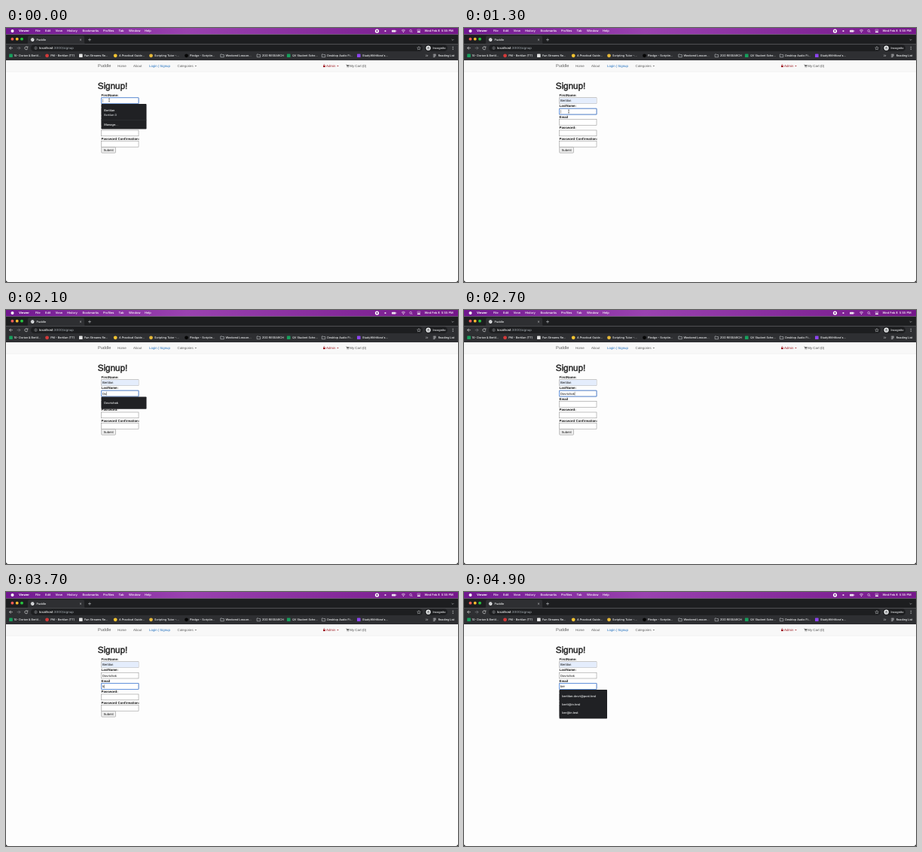
These frames come from a looping animation (600x338 px, 5000 ms). An HTML page:

```html
<!DOCTYPE html>
<html lang="en">
<head>
<meta charset="utf-8">
<title>Signup form</title>
<style>
html, body { margin: 0; width: 100%; height: 100%; overflow: hidden; background: #fdfdfd; }
svg { display: block; width: 100vw; height: 100vh; }
text { white-space: pre; text-rendering: geometricPrecision; }
.ui { font-family: Inter, Roboto, sans-serif; font-weight: 500; }
.page { font-family: "Liberation Sans", sans-serif; }
</style>
</head>
<body>
<svg id="stage" viewBox="0 0 600 338" preserveAspectRatio="none">
  <defs>
    <linearGradient id="bar">
      <stop offset="0" stop-color="#70178f"/>
      <stop offset=".4" stop-color="#9a42b0"/>
      <stop offset="1" stop-color="#75178a"/>
    </linearGradient>
  </defs>
  <g id="browser" class="ui"></g>
  <g id="page" class="page"></g>
  <g id="live"></g>
</svg>
<script>
const $ = id => document.getElementById(id);

const rect = (x, y, w, h, fill, extra = '') =>
  `<rect x="${x}" y="${y}" width="${w}" height="${h}" fill="${fill}" ${extra}/>`;
const dot = (x, y, r, fill, extra = '') =>
  `<circle cx="${x}" cy="${y}" r="${r}" fill="${fill}" ${extra}/>`;
const line = (d, color, width = .5) =>
  `<path d="${d}" fill="none" stroke="${color}" stroke-width="${width}"/>`;
const shape = (d, fill) => `<path d="${d}" fill="${fill}"/>`;
const label = (x, y, size, fill, text, extra = '') =>
  `<text x="${x}" y="${y}" font-size="${size}" fill="${fill}" ${extra}>${text.replace(/&/g, '&amp;')}</text>`;
const BOLD = 'font-weight="700"';

const STRIP = '#1d1e20', TOOLBAR = '#2e2f32', PILL = '#1d1e20';

function menuBar() {
  const menus = [['File', 39], ['Edit', 52], ['View', 65.5], ['History', 81], ['Bookmarks', 101.5],
    ['Profiles', 129], ['Tab', 149.5], ['Window', 163], ['Help', 184]];
  return rect(0, 0, 600, 8.5, 'url(#bar)')
    + dot(8.5, 4, 2, '#fff')
    + label(17, 5.3, 4, '#fff', 'Viewer', BOLD)
    + menus.map(([text, x]) => label(x, 5.3, 4, '#fff', text)).join('')
    + dot(492.5, 4, 2.6, '#fff') + rect(491.6, 3.1, 1.8, 1.8, '#75178a', 'rx=".3"')
    + dot(503.5, 4, 1.1, '#eadcf0')
    + rect(512, 2.7, 5.4, 2.7, '#eee2f2', 'rx=".7"') + rect(517.8, 3.4, .5, 1.3, '#eee2f2')
    + line('M525 3.3Q527.5 1.3 530 3.3M526 4.4Q527.5 3.3 529 4.4', '#fff', .6) + dot(527.5, 5.4, .5, '#fff')
    + dot(537.2, 3.7, 1.4, 'none', 'stroke="#fff" stroke-width=".5"') + line('M538.2 4.7L539.5 6', '#fff')
    + rect(545.8, 2.1, 4.3, 1.6, 'none', 'rx=".8" stroke="#fff" stroke-width=".4"')
    + rect(545.8, 4.5, 4.3, 1.6, '#fff', 'rx=".8"')
    + label(555.5, 5.3, 4, '#fff', 'Wed Feb 8  5:55 PM');
}

function tabStrip() {
  return rect(0, 8.5, 600, 12.7, STRIP)
    + ['#fe5f57', '#febc2e', '#28c840'].map((c, i) => dot(8.4 + i * 6.3, 14.7, 1.9, c)).join('')
    + shape('M27 21.2Q29 21.2 29 19V12.5Q29 10.2 31.3 10.2H101.7Q104 10.2 104 12.5V19Q104 21.2 106 21.2Z', TOOLBAR)
    + dot(35.2, 15.6, 2.3, '#f1f3f4') + line('M33.5 14.6L35 15.2L34.6 16.9M36 13.8L36.8 15.4', '#55575c')
    + label(40.5, 17, 3.75, '#f1f3f4', 'Puddle')
    + line('M97.9 14.5L100.1 16.7M100.1 14.5L97.9 16.7', '#dfe1e5', .45)
    + line('M109 15.6H113M111 13.6V17.6', '#dfe1e5')
    + line('M591.6 15L593 16.4L594.4 15', '#dfe1e5');
}

function toolbar() {
  return rect(0, 21.2, 600, 21.8, TOOLBAR)
    + line('M8.8 26.7H4.6M6.5 24.7L4.5 26.7L6.5 28.7', '#f1f3f4', .6)
    + line('M14.6 26.7H18.8M16.9 24.7L18.9 26.7L16.9 28.7', '#898c91', .6)
    + line('M28.4 25.5A2 2 0 1 0 28.8 27.2M28.9 24.5V25.9H27.4', '#f1f3f4', .6)
    + rect(33, 22.3, 520, 8.8, PILL, 'rx="4.4"')
    + dot(39.5, 26.7, 1.7, 'none', 'stroke="#c4c7cc" stroke-width=".4"') + line('M39.5 26.4V27.8M39.5 25.5V25.9', '#c4c7cc')
    + label(44, 28.2, 4.25, '#fff', 'localhost<tspan fill="#9aa0a6">:3000/signup</tspan>')
    + line('M548 24.5L548.7 26L550.3 26.2L549.1 27.3L549.4 28.9L548 28.1L546.6 28.9L546.9 27.3L545.7 26.2L547.3 26Z', '#e8eaed', .4)
    + rect(556, 22.3, 30, 8.8, PILL, 'rx="4.4"')
    + dot(560.6, 26.7, 3.1, '#f1f3f4')
    + line('M558.9 26.3H562.3M559.7 25.5H561.5', '#303134', .6)
    + dot(559.8, 27.8, .6, '#303134') + dot(561.4, 27.8, .6, '#303134')
    + label(566.5, 28.1, 3.8, '#f1f3f4', 'Incognito')
    + [25, 26.7, 28.4].map(y => dot(593.2, y, .5, '#f1f3f4')).join('');
}

function bookmarks() {
  const square = color => x => rect(x - 2.3, 34.5, 4.6, 4.6, color, 'rx=".6"');
  const disc = color => x => dot(x, 36.8, 2.4, color);
  const folder = x => line(`M${x - 2.2} 35V38.7H${x + 2.3}V35.6H${x}L${x - .6} 35Z`, '#c6c9cd', .6);
  const items = [
    [6.5, 10.5, square('#17a05d'), '10- Dorian & Bertil...'],
    [54.5, 59.2, disc('#d63a3a'), 'PM - Bertilan (TT)'],
    [99.3, 104, square('#e4e4e4'), 'Fun Streams Re...'],
    [145.2, 150, disc('#f5c431'), 'A Practical Guide...'],
    [192.5, 197, disc('#e6b93a'), 'Scripting Tutor -...'],
    [239.5, 244, disc('#050505'), 'Pledge - Scriptin...'],
    [287, 291.5, folder, 'Weekend Lesson...'],
    [335.3, 340, folder, 'ZOD RESEARCH'],
    [375.2, 380, square('#17a05d'), 'QV Student Sche...'],
    [421.5, 426.3, folder, 'Desktop Audio Fi...'],
    [468.3, 473, square('#8d45f0'), 'StudyWithNora\'s...']
  ];
  return items.map(([iconX, x, icon, text]) => icon(iconX) + label(x, 38.2, 3.75, '#f1f3f4', text)).join('')
    + line('M557.2 35.6L558.3 36.8L557.2 38M558.8 35.6L559.9 36.8L558.8 38', '#e8eaed')
    + line('M566.8 35.2H571M566.8 36.8H571M566.8 38.4H569M569 34.6V39', '#d0d2d6', .6)
    + label(573.7, 38.2, 3.75, '#f1f3f4', 'Reading List');
}

function navBar() {
  const links = [['Home', 148, '#606060'], ['About', 169, '#606060'], ['Login | Signup', 190, '#1c6dbd'],
    ['Categories', 227.5, '#606060'], ['Admin', 425, '#a01f26'], ['My Cart (0)', 456.3, '#484848']];
  const arrow = (x, color) => shape(`M${x} 49.9h2.5l-1.25 1.3Z`, color);
  return rect(0, 43, 600, 15.2, '#f8f8f8') + rect(0, 57.9, 600, .4, '#e3e3e3')
    + label(122, 52.4, 5.625, '#606060', 'Puddle')
    + links.map(([text, x, color]) => label(x, 52, 4.4, color, text)).join('')
    + arrow(250.6, '#606060') + arrow(439.2, '#a01f26')
    + rect(421, 50, 2.8, 2.1, '#a01f26') + line('M421.6 50V49.3A.8 .8 0 0 1 423.2 49.3V50', '#a01f26')
    + line('M451.3 48.8H452.2L452.8 51.2H455', '#484848', .4) + shape('M452.3 49.2H455.6L455 50.7H452.6Z', '#484848')
    + dot(453, 52, .4, '#484848') + dot(454.8, 52, .4, '#484848');
}

const PITCH = 14.4;
const fieldY = i => 92.8 + i * PITCH;

function form() {
  const names = ['FirstName:', 'LastName:', 'Email', 'Password:', 'Password Confirmation:'];
  return label(121.7, 81, 11.7, '#222', 'Signup!', 'stroke="#222" stroke-width=".45"')
    + names.map((name, i) => label(126.5, 90.9 + i * PITCH, 4.4, '#111', name, BOLD)
      + rect(126.7, fieldY(i), 49.3, 7.8, '#fff', 'stroke="#858585" stroke-width=".5"')).join('')
    + rect(126.7, 158.5, 18.8, 7.7, '#efefef', 'rx=".9" stroke="#858585" stroke-width=".5"')
    + label(136.1, 163.9, 4.25, '#111', 'Submit', 'text-anchor="middle"');
}

const corners = shape('M0 335V338H3Q0 338 0 335ZM600 335V338H597Q600 338 600 335Z', '#000');

const FIRST = 'Bertilan', LAST = 'Dovrichak', FULL = 'Bertilan D';
const EMAILS = ['bertilan.dovri@post.test', 'berti@in.test', 'ber@in.test'];

// rows: [text, text centre below the popup top, is secondary]; rules: separator offsets
const list = (texts, width = 60) =>
  ({ width, height: 5 + texts.length * 11.2, rows: texts.map((text, i) => [text, 8.2 + i * 11.2]), rules: [] });
const popups = {
  first: { width: 60, height: 33.5, rows: [[FIRST, 8.2], [FULL, 14.8, true], ['Manage...', 27.2]], rules: [21] },
  last: { width: 60, height: 46.7, rules: [21.2, 34],
    rows: [['D', 8.2], [FULL, 14.8, true], ['Clear form', 27.3], ['Manage...', 40.2]] },
  surname: list([LAST]),
  emailsAll: list([...EMAILS, 'bd@in.test'], 63.5),
  emails: list(EMAILS, 63.5)
};

// Each step changes only the listed properties.
const steps = [
  [0, { focus: 0, values: ['', '', ''], popup: 'first', hover: false, filled: false }],
  [600, { values: [FIRST, '', ''], hover: true, filled: true }],
  [900, { popup: null, hover: false }],
  [1300, { focus: 1 }],
  [1400, { popup: 'last' }],
  [1700, { values: [FIRST, 'D', ''] }],
  [2000, { values: [FIRST, 'Do', ''], popup: 'surname' }],
  [2300, { values: [FIRST, 'Dovri', ''] }],
  [2400, { values: [FIRST, 'Dovricha', ''] }],
  [2700, { values: [FIRST, LAST, ''], popup: null }],
  [3200, { focus: 2 }],
  [3700, { values: [FIRST, LAST, 'b'] }],
  [3800, { popup: 'emailsAll' }],
  [3900, { values: [FIRST, LAST, 'be'], popup: 'emails' }],
  [4100, { values: [FIRST, LAST, 'ber'] }]
];
const pointerPath = [[0, 137, 96], [200, 138, 96.8], [400, 138, 96.8], [600, 140, 106], [800, 141, 112],
  [1000, 141, 112], [1300, 139, 111], [1600, 139, 111], [1800, 140, 115]];
const POINTER_END = 1900;

function stateAt(t) {
  const past = steps.filter(([start]) => start <= t);
  return Object.assign({ edited: past[past.length - 1][0] }, ...past.map(([, change]) => change));
}

function pointerAt(t) {
  const next = pointerPath.findIndex(([start]) => start > t);
  if (next < 0) return pointerPath[pointerPath.length - 1].slice(1);
  const [t0, x0, y0] = pointerPath[next - 1], [t1, x1, y1] = pointerPath[next];
  const k = (t - t0) / (t1 - t0);
  return [x0 + (x1 - x0) * k, y0 + (y1 - y0) * k];
}

function drawPopup({ width, height, rows, rules }, top, hover) {
  return rect(126.5, top, width, height, '#202124', 'rx=".8"')
    + (hover ? rect(126.5, top + 2.2, width, 18.8, '#3a3c40') : '')
    + rules.map(y => rect(126.5, top + y, width, .35, '#3c4043')).join('')
    + rows.map(([text, y, secondary]) => label(130.2, top + y + 1.4, secondary ? 3.65 : 3.9,
      secondary ? '#d0d3d7' : '#f1f3f4', text, 'class="ui"')).join('');
}

function drawPointer(x, y, arrow) {
  return `<g transform="translate(${x} ${y})">` + (arrow
    ? '<path d="M-1 -1.8V2L0 1.2L.6 2.7L1.3 2.4L.7 1H1.8Z" fill="#000" stroke="#fff" stroke-width=".35"/>'
    : line('M-.9 -2.2Q0 -2.2 0 -1.5Q0 -2.2 .9 -2.2M0 -1.6V1.6M-.9 2.2Q0 2.2 0 1.5Q0 2.2 .9 2.2', '#222')) + '</g>';
}

const pen = document.createElement('canvas').getContext('2d');
pen.font = '100px "Liberation Sans", sans-serif';
const textWidth = (text, size) => pen.measureText(text).width * size / 100;

const INPUT_SIZE = 4.25;

function draw(t) {
  const { focus, values, popup, hover, filled, edited } = stateAt(t);
  const top = fieldY(focus);
  let out = filled ? rect(126.95, fieldY(0) + .25, 48.8, 7.3, '#e4edfc') : '';
  out += rect(126.6, top - .1, 49.5, 8, 'none', 'rx=".5" stroke="#4a87e4" stroke-width=".8"');
  out += values.map((text, i) => label(127.9, fieldY(i) + 5.5, INPUT_SIZE, '#111', text, 'class="page"')).join('');
  if (!hover && Math.floor((t - edited) / 500) % 2 === 0)
    out += rect(128 + textWidth(values[focus], INPUT_SIZE), top + 1.6, .35, 4.8, '#111');
  if (popup) out += drawPopup(popups[popup], top + 8.3, hover);
  if (t < POINTER_END) out += drawPointer(...pointerAt(t), hover);
  $('live').innerHTML = out;
}

$('browser').innerHTML = menuBar() + tabStrip() + toolbar() + bookmarks();
$('page').innerHTML = navBar() + form() + corners;

const LOOP = 5000, TICK = 100;
const begin = performance.now();
let shown = -1;
function frame() {
  const t = Math.floor((performance.now() - begin) % LOOP / TICK) * TICK;
  if (t !== shown) draw(shown = t);
  requestAnimationFrame(frame);
}
frame();
</script>
</body>
</html>
```
